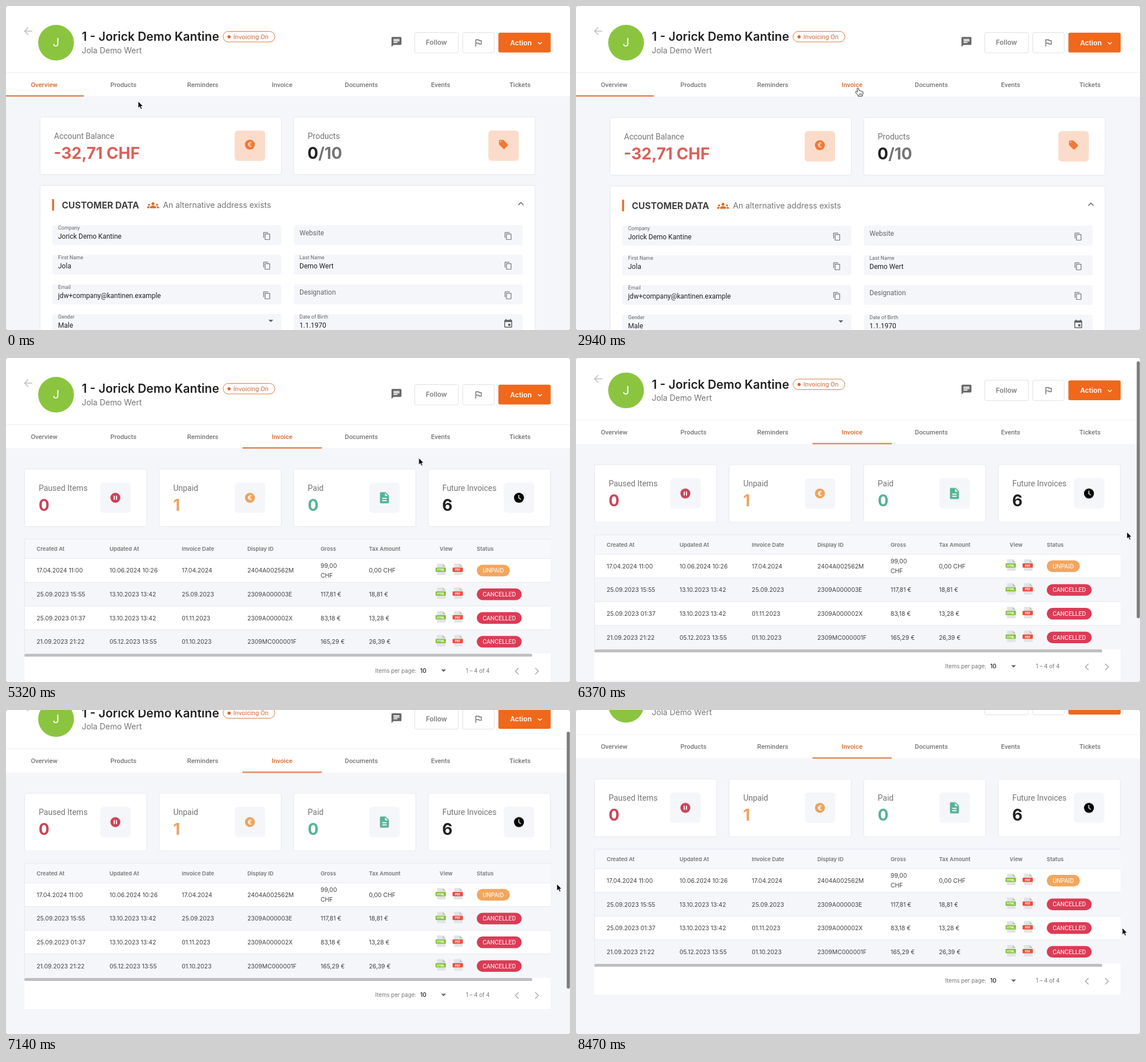
An HTML page for the animation above (8540 ms loop, 986 px wide and 568 px high).

```html
<!DOCTYPE html>
<html lang="en">
<head>
<meta charset="utf-8">
<title>Customer invoices</title>
<style>
html, body { margin: 0; width: 100%; height: 100%; overflow: hidden; background: #f5f6fa; }
svg { display: block; width: 986px; height: 568px; }
text { font-family: Roboto, sans-serif; fill: #757575; }
.inter { font-family: Inter, sans-serif; }
.mid { text-anchor: middle; }
.tab { font-size: 11.3px; font-weight: 500; }
.label { font-size: 14px; }
.sub { font-size: 13.9px; }
.big { font-size: 28px; font-weight: 700; }
.field { font-size: 12px; fill: #212121; }
.hint { font-size: 12px; fill: #666; }
.float { font-size: 9px; fill: #666; }
.cell { font-size: 10.4px; fill: #424242; }
.head { font-size: 9.5px; font-weight: 600; }
.chip { font-size: 10.5px; fill: #fff; }
.pager { font-size: 9.7px; }
.card { fill: #fff; stroke: #e5e7ee; }
.line { fill: none; stroke-width: 1.5; }

.page, .thumb, .cursor, .ink, .spin, .arc { animation: 8540ms linear infinite; }
.tab-from, .tab-to, .overview, .invoice, .loading, .loaded, .settle3, .settle6, .bar, .arrow, .hand {
  animation: 8540ms step-end infinite;
}
.page { animation-name: scroll; }
.thumb { animation-name: thumb; }
.bar { animation-name: bar; }
.cursor { animation-name: cursor; }
.arrow { animation-name: arrow; }
.hand { animation-name: hand; }
.ink { animation-name: ink; }
.spin { animation-name: spin; }
.arc { animation-name: arc; }
.tab-from { animation-name: tab-from; }
.tab-to { animation-name: tab-to; }
.overview { animation-name: overview; }
.invoice { animation-name: invoice; }
.loading { animation-name: loading; }
.loaded { animation-name: loaded; }
.settle3 { animation-name: settle3; }
.settle6 { animation-name: settle6; }

@keyframes cursor {
  0%, 14.754% { transform: translate(231px, 167px); }
  16.393% { transform: translate(262px, 172px); }
  19.672% { transform: translate(440px, 186px); }
  22.951%, 23.77% { transform: translate(499px, 181px); }
  29.508%, 45.082% { transform: translate(493px, 144px); }
  49.18% { transform: translate(495px, 143px); }
  54.918%, 61.475% { transform: translate(691px, 176px); }
  62.295% { transform: translate(721px, 175px); }
  65.574% { transform: translate(878px, 232px); }
  68.033%, 95.902% { transform: translate(963px, 305px); }
  99.18%, 100% { transform: translate(955px, 382px); }
}
@keyframes arrow { 0% { visibility: visible; } 27.05% { visibility: hidden; } 51.64%, 100% { visibility: visible; } }
@keyframes hand { 0% { visibility: hidden; } 27.05% { visibility: visible; } 51.64%, 100% { visibility: hidden; } }
@keyframes scroll {
  0%, 72.951% { transform: translateY(0); }
  77.869% { transform: translateY(-22.5px); }
  83.607% { transform: translateY(-48.5px); }
  90.164%, 100% { transform: translateY(-73.5px); }
}
@keyframes thumb {
  0%, 72.951% { transform: translateY(0); }
  77.869% { transform: translateY(17px); }
  83.607% { transform: translateY(38px); }
  90.164%, 100% { transform: translateY(57px); }
}
@keyframes bar { 0% { visibility: hidden; } 73.77% { visibility: visible; } 96.721%, 100% { visibility: hidden; } }
@keyframes ink {
  0%, 34.426% { transform: translateX(0); animation-timing-function: cubic-bezier(.35, 0, .25, 1); }
  40.164%, 100% { transform: translateX(416px); }
}
@keyframes tab-from { 0% { fill: #d96a2b; } 34.426%, 100% { fill: #757575; } }
@keyframes tab-to { 0% { fill: #757575; } 34.426%, 100% { fill: #d96a2b; } }
@keyframes overview {
  0% { visibility: visible; transform: none; }
  34.426% { visibility: visible; transform: translateY(1px); }
  38.525%, 100% { visibility: hidden; transform: none; }
}
@keyframes invoice { 0% { visibility: hidden; } 38.525%, 100% { visibility: visible; } }
@keyframes loading { 0% { visibility: hidden; } 38.525% { visibility: visible; } 55.738%, 100% { visibility: hidden; } }
@keyframes loaded { 0% { visibility: hidden; } 55.738%, 100% { visibility: visible; } }
@keyframes settle3 { 0% { transform: translateY(-3px); } 55.738%, 100% { transform: none; } }
@keyframes settle6 { 0% { transform: translateY(-6px); } 55.738%, 100% { transform: none; } }
@keyframes spin { 0%, 38.525% { transform: rotate(-118deg); } 55.738%, 100% { transform: rotate(250deg); } }
@keyframes arc {
  0%, 38.525% { stroke-dasharray: 2 100; }
  44.262% { stroke-dasharray: 17 100; }
  50%, 100% { stroke-dasharray: 72 100; }
}
</style>
</head>
<body>
<svg viewBox="0 0 986 568">
  <defs>
    <path id="copy" d="M16 1H4c-1.1 0-2 .9-2 2v14h2V3h12V1zm3 4H8c-1.1 0-2 .9-2 2v14c0 1.1.9 2 2 2h11c1.1 0 2-.9 2-2V7c0-1.1-.9-2-2-2zm0 16H8V7h11v14z"/>
    <path id="people" d="M12 12.75c1.63 0 3.07.39 4.24.9 1.08.48 1.76 1.56 1.76 2.73V18H6v-1.61c0-1.18.68-2.26 1.76-2.73 1.17-.52 2.61-.91 4.24-.91zM4 13c1.1 0 2-.9 2-2s-.9-2-2-2-2 .9-2 2 .9 2 2 2zm1.13 1.1c-.37-.06-.74-.1-1.13-.1-.99 0-1.93.21-2.78.58C.48 14.9 0 15.62 0 16.43V18h4.5v-1.61c0-.83.23-1.61.63-2.29zM20 13c1.1 0 2-.9 2-2s-.9-2-2-2-2 .9-2 2 .9 2 2 2zm4 3.43c0-.81-.48-1.53-1.22-1.85-.85-.37-1.79-.58-2.78-.58-.39 0-.76.04-1.13.1.4.68.63 1.46.63 2.29V18H24v-1.57zM12 6c1.66 0 3 1.34 3 3s-1.34 3-3 3-3-1.34-3-3 1.34-3 3-3z"/>
    <path id="chat" d="M20 2H4c-1.1 0-2 .9-2 2v18l4-4h14c1.1 0 2-.9 2-2V4c0-1.1-.9-2-2-2zM6 9h12v2H6V9zm8 5H6v-2h8v2zm4-6H6V6h12v2z"/>
    <path id="flag" d="M12.36 6l.4 2H18v6h-3.36l-.4-2H7V6h5.36M14 4H5v17h2v-7h5.6l.4 2h7V6h-5.6L14 4z"/>
    <path id="tag" d="M21.41 11.58l-9-9C12.05 2.22 11.55 2 11 2H4c-1.1 0-2 .9-2 2v7c0 .55.22 1.05.59 1.42l9 9c.36.36.86.58 1.41.58.55 0 1.05-.22 1.41-.59l7-7c.37-.36.59-.86.59-1.41 0-.55-.23-1.06-.59-1.42zM5.5 7C4.67 7 4 6.33 4 5.5S4.67 4 5.5 4 7 4.67 7 5.5 6.33 7 5.5 7z"/>
    <path id="date" d="M17 12h-5v5h5v-5zM16 1v2H8V1H6v2H5c-1.1 0-2 .9-2 2v14c0 1.1.9 2 2 2h14c1.1 0 2-.9 2-2V5c0-1.1-.9-2-2-2h-1V1h-2zm3 18H5V8h14v11z"/>
    <path id="doc" d="M14 2H6c-1.1 0-2 .9-2 2v16c0 1.1.9 2 2 2h12c1.1 0 2-.9 2-2V8l-6-6zm2 16H8v-2h8v2zm0-4H8v-2h8v2zm-3-5V3.5L18.5 9H13z"/>
  </defs>

  <g class="page">
    <rect y="-5" width="986" height="163" fill="#fff"/>
    <path d="M0 116.5H986" stroke="#f0f0f2"/>

    <path class="line" d="M46 44H33M39 37.5L32.5 44L39 50.5" stroke="#bdbdbd"/>
    <circle cx="87.5" cy="64.3" r="31.3" fill="#8bc53f"/>
    <text class="mid" x="87.5" y="71.2" style="font-size:20px;fill:#fff">J</text>
    <text class="inter" x="132.5" y="61.2" style="font-size:21px;font-weight:600;fill:#212121">1 - Jorick Demo Kantine</text>
    <text class="inter sub" x="132.5" y="82.7">Jola Demo Wert</text>
    <rect x="379.5" y="44.5" width="90.5" height="18.5" rx="9.25" fill="#fff" stroke="#d97a45"/>
    <circle cx="390" cy="54" r="2.7" fill="#d9602a"/>
    <text x="397.5" y="57.8" style="font-size:11.2px;fill:#d0693a">Invoicing On</text>
    <use href="#chat" transform="translate(672.2 52.5) scale(.87)" fill="#686868"/>
    <g fill="#fff" stroke="#e0e0e0">
      <rect x="714.5" y="46.5" width="76.5" height="35.5" rx="3"/>
      <rect x="798.5" y="46.5" width="55" height="35.5" rx="3"/>
    </g>
    <text class="inter mid" x="752.5" y="68.4" style="font-size:11.9px;font-weight:600;fill:#808080">Follow</text>
    <use href="#flag" transform="translate(817 55.7) scale(.73)" fill="#757575"/>
    <rect x="860.8" y="46.8" width="91.4" height="34.8" rx="3" fill="#ef681c"/>
    <text class="inter" x="881.2" y="68.5" style="font-size:12.1px;font-weight:600;fill:#fff">Action</text>
    <path class="line" d="M930 63.5L933.3 66.8L936.6 63.5" stroke="#fff"/>

    <g class="overview" id="overview"></g>
    <g class="invoice" id="invoice"></g>

    <g id="tabs"></g>
    <rect class="ink" x="-2.6" y="156.6" width="138.6" height="2" fill="#d96a2b"/>
  </g>

  <g class="bar"><rect class="thumb" x="980.3" y="0" width="5.4" height="450.5" rx="2.7" fill="#7c7c7c"/></g>

  <path fill="#8a8a8a" d="M0 0H2.5Q0 0 0 2.5ZM986 0V2.5Q986 0 983.5 0ZM0 568V565.5Q0 568 2.5 568ZM986 568H983.5Q986 568 986 565.5Z"/>

  <g class="cursor" stroke-linejoin="round">
    <path class="arrow" d="M0 0V12L2.8 9.5L4.7 13.8L6.8 12.9L5 8.8H8.7Z" fill="#000" stroke="#fff" stroke-width=".9"/>
    <g class="hand">
      <path d="M-1.6 1.2Q-1.6 -.3 -.3 -.3Q1 -.3 1.2 1.2L1.9 4.6Q3.6 3.6 4.4 5.2Q6 4.4 6.8 6Q8.9 5.6 8.9 7.6Q8.9 10.6 7.6 12.2V14H0V12.4Q-2.4 9.8 -4.4 7.6Q-5 6.2 -3.6 5.8Q-2.4 5.7 -1 7.2Z" fill="#fff" stroke="#222" stroke-width="1"/>
      <path d="M2 9.2V12M4 9.2V12M6 9.2V12" stroke="#222" stroke-width=".8"/>
    </g>
  </g>
</svg>

<script>
const byId = id => document.getElementById(id);
const text = (x, y, cls, s, style = '') => `<text x="${x}" y="${y}" class="${cls}" style="${style}">${s}</text>`;
const rect = (x, y, w, h, rx, fill) => `<rect x="${x}" y="${y}" width="${w}" height="${h}" rx="${rx}" fill="${fill}"/>`;
const card = (x, y, w, h) => `<rect class="card" x="${x}" y="${y}" width="${w}" height="${h}" rx="3"/>`;
const tile = (x, fill) => rect(x, 218.3, 53.3, 53.3, 6, fill);
const icon = (id, cx, cy, k, fill) =>
  `<use href="#${id}" transform="translate(${cx - 12 * k} ${cy - 12 * k}) scale(${k})" fill="${fill}"/>`;
const disc = (cx, cy, fill) => `<circle cx="${cx}" cy="${cy}" r="8.7" fill="${fill}"/>`;
const euro = (cx, cy, fill, ink) => disc(cx, cy, fill) +
  text(cx, cy + 4.3, 'inter mid', '€', `font-size:12px;font-weight:600;fill:${ink}`);
const caret = (x, y) => `<path d="M${x - 4.3} ${y - 2}h8.6l-4.3 4.3z" fill="#666"/>`;

// Tabs
byId('tabs').innerHTML = ['Overview', 'Products', 'Reminders', 'Invoice', 'Documents', 'Events', 'Tickets']
  .map((name, i) => text(66.7 + 138.63 * i, 141.8, 'mid tab ' + (['tab-from', , , 'tab-to'][i] || ''), name)).join('');

// Overview
const fields = [
  ['Company', 'Jorick Demo Kantine'], ['Website'],
  ['First Name', 'Jola'], ['Last Name', 'Demo Wert'],
  ['Email', 'jdw+company@kantinen.example'], ['Designation'],
  ['Gender', 'Male', 'select'], ['Date of Birth', '1.1.1970', 'date']
];
function field([label, value, kind], i) {
  const x = i % 2 ? 503 : 81, y = 384 + 52 * (i >> 1), ix = i % 2 ? 878 : 456;
  const mark = kind === 'select' ? caret(463, y + 12)
    : kind === 'date' ? icon('date', ix, y + 17, .76, '#616161')
    : icon('copy', ix, y + 19.3, .62, '#757575');
  return rect(x, y, 400.5, 35, 4, '#f5f6fa') + mark + (value
    ? text(x + 10, y + 7.5, 'float', label) + text(x + 10, y + 23.6, 'field', value)
    : text(x + 10, y + 17.6, 'hint', label));
}
byId('overview').innerHTML =
  rect(0, 150, 986, 8, 0, '#fff') +
  card(59.5, 194.5, 422, 101) + card(503, 194.5, 422, 101) +
  text(84, 232.5, 'label', 'Account Balance') +
  text(83.5, 267.5, 'inter big', '-32,71 CHF', 'fill:#d9605a') +
  tile(399.7, '#fbdccb') + euro(426.3, 243, '#ee7a38', '#fbdccb') +
  text(527.5, 232.5, 'label', 'Products') +
  text(527, 267.5, 'inter big', '<tspan fill="#212121">0</tspan>/10') +
  tile(843.2, '#fbdccb') + icon('tag', 869.8, 242.8, .8, '#ee7a38') +
  card(59.5, 314.5, 865.5, 300) +
  rect(80.5, 338.5, 3.6, 20.5, 1, '#e8702c') +
  text(97.5, 354.7, 'inter', 'CUSTOMER DATA', 'font-size:15.7px;font-weight:700;fill:#424242') +
  icon('people', 257, 349.3, .87, '#dd6b26') +
  text(274.5, 354, 'inter sub', 'An alternative address exists') +
  '<path class="line" d="M895.7 349L900.2 344.5L904.7 349" stroke="#616161"/>' +
  fields.map(field).join('');

// Invoice cards
const cards = [
  ['Paused Items', 0, '#c9455a', x => disc(x, 245, '#cc4257') +
    rect(x - 2.9, 241.5, 1.9, 7, 0, '#fff') + rect(x + 1, 241.5, 1.9, 7, 0, '#fff')],
  ['Unpaid', 1, '#eca45f', x => euro(x, 245, '#eca45f', '#fff')],
  ['Paid', 0, '#56b394', x => icon('doc', x, 245, .98, '#56b394')],
  ['Future Invoices', 6, '#212121', x => disc(x, 245, '#000') +
    `<path d="M${x - .3} 240V245.3L${x + 3.4} 248" fill="none" stroke="#fff" stroke-width="1.4"/>`]
];
const invoiceCards = cards.map(([label, n, fill, draw], i) => {
  const x = 32.5 + 235.2 * i;
  return `<g class="loading">${card(x, 194.5, 213.5, 95)}<g transform="translate(${x + 35.3} 253)"><g class="spin">
    <circle class="arc" r="10.2" pathLength="100" fill="none" stroke="#d0692f" stroke-width="2"/></g></g></g>
    <g class="loaded">${card(x, 194.5, 213.5, 101)}${text(x + 24.5, 267.5, 'inter big', n, 'fill:' + fill)}</g>` +
    text(x + 24.7, 232.5, 'label', label) +
    `<g class="settle3">${tile(x + 132.2, '#f5f6fa')}${draw(x + 158.7)}</g>`;
}).join('');

// Invoice table
const cols = [53.5, 181, 307.3, 422, 550, 634.5];
const heads = ['Created At', 'Updated At', 'Invoice Date', 'Display ID', 'Gross', 'Tax Amount'];
const rows = [
  ['17.04.2024 11:00', '10.06.2024 10:26', '17.04.2024', '2404A002562M', '99,00|CHF', '0,00 CHF'],
  ['25.09.2023 15:55', '13.10.2023 13:42', '25.09.2023', '2309A000003E', '117,81 €', '18,81 €'],
  ['25.09.2023 01:37', '13.10.2023 13:42', '01.11.2023', '2309A000002X', '83,18 €', '13,28 €'],
  ['21.09.2023 21:22', '05.12.2023 13:55', '01.10.2023', '2309MC000001F', '165,29 €', '26,39 €']
];
const file = (x, y, name, fill) =>
  `<path d="M${x + 2.5} ${y - 12}h10l5 5v15h-15z" fill="#e2e3e5"/><path d="M${x + 12.5} ${y - 12}v5h5z" fill="#bfc2c6"/>` +
  rect(x, y - 5, 18, 7.5, 1, fill) +
  text(x + 9, y + .7, 'mid', name, 'font-size:5px;font-weight:700;fill:#fff');
const chip = (y, name, w, fill) => rect(823, y - 10.2, w, 20.4, 10.2, fill) +
  text(823 + w / 2, y + 3.7, 'mid chip', name);

function row(cells, i) {
  const top = 351.6 + 41.6 * i, y = top + 21;
  const body = cells.map((cell, c) => {
    const lines = cell.split('|');
    return lines.map((s, k) =>
      text(cols[c], y + 3.8 + 17 * (k - (lines.length - 1) / 2), 'inter cell', s)).join('');
  }).join('');
  return rect(32, top, 920, 41.6, 0, i % 2 ? '#f5f6fa' : '#fff') +
    `<path d="M32 ${top}H952" stroke="#e5e7ee"/>` + body +
    file(751, y, 'HTML', '#84c13f') + file(780.7, y, 'PDF', '#e8503f') +
    (i ? chip(y, 'CANCELLED', 78.5, '#dc3b56') : chip(y, 'UNPAID', 57.8, '#f2a65e'));
}
const table =
  rect(32, 317.5, 920, 255, 0, '#fff') + rect(32, 317.5, 920, 34, 0, '#f7f8fb') +
  heads.map((s, c) => text(cols[c], 338.4, 'inter head', s)).join('') +
  text(758, 338.4, 'inter head', 'View') + text(823, 338.4, 'inter head', 'Status') +
  rows.map(row).join('') +
  '<path d="M952 317.5H32.5V518" fill="none" stroke="#e5e7ee"/>' +
  rect(32, 518.4, 888, 5.2, 2.6, '#bfbfbf') +
  text(645.5, 551.8, 'inter pager', 'Items per page:') +
  text(724, 551.8, 'inter pager', '10', 'font-weight:500;fill:#212121;font-size:10.4px') +
  caret(765, 548) + text(804, 551.5, 'inter pager', '1 – 4 of 4') +
  '<path class="line" d="M896 543.5L890.5 549L896 554.5M925.2 543.5L930.7 549L925.2 554.5" stroke="#aaa"/>';

byId('invoice').innerHTML = invoiceCards + `<g class="settle6">${table}</g>`;
</script>
</body>
</html>
```
